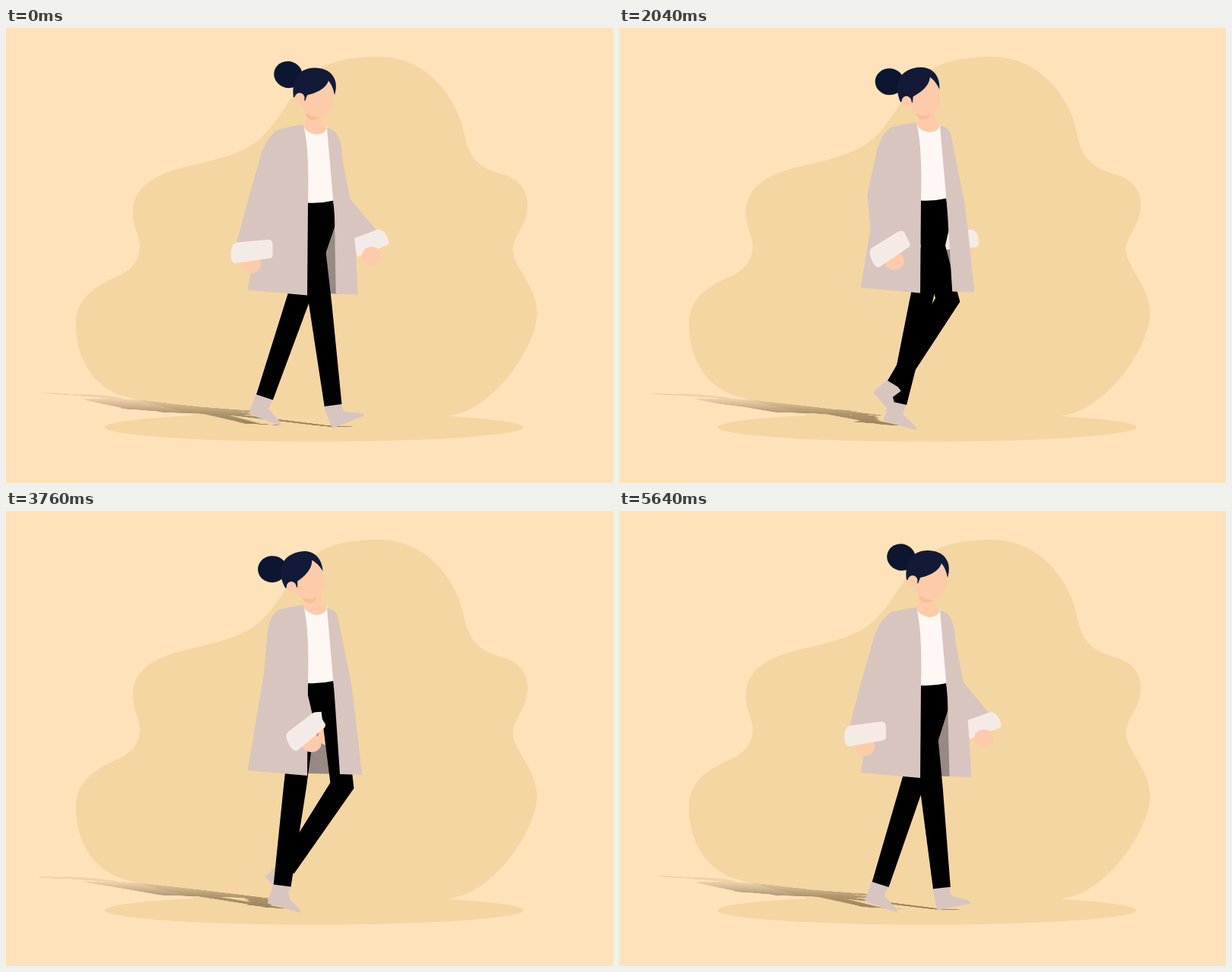
These frames come from a looping animation (800 px wide and 600 px high, 5.68 s). An HTML page with a canvas:

```html
<!DOCTYPE html>
<html>
<head>
<meta charset="utf-8">
<title>Walk cycle</title>
<style>
html, body { margin: 0; width: 100%; height: 100%; overflow: hidden; background: #ffe2ba; }
canvas { display: block; }
</style>
</head>
<body>
<canvas id="stage" width="800" height="600"></canvas>
<script>
const LOOP = 5680, CYCLE = LOOP / 5, { PI, sin, cos, max, min, hypot, sqrt } = Math;
const COAT = '#d8c5bf', CUFF = '#f5ebe6', SKIN = '#fdcba9', SAND = '#f4d6a3', HAIR = '#131a38', BUN = '#0d1631';
const BONE = 132; // thigh and shin have the same length

const layer = () => Object.assign(document.createElement('canvas'), { width: 800, height: 600 }).getContext('2d');
const stage = document.getElementById('stage').getContext('2d');
const fig = layer(), shade = layer();

const smooth = (t, a, b) => {
  const s = min(1, max(0, (t - a) / (b - a)));
  return s * s * (3 - 2 * s);
};
const fill = (g, color, d) => { g.fillStyle = color; g.fill(new Path2D(d)); };
const poly = (color, pts) => fill(fig, color, 'M' + pts.join('L') + 'Z');
function oval(color, x, y, rx, ry = rx, angle = 0, g = fig) {
  g.fillStyle = color;
  g.beginPath();
  g.ellipse(x, y, rx, ry, angle, 0, 7);
  g.fill();
}
function at(x, y, degrees, draw) {
  fig.save();
  fig.translate(x, y);
  fig.rotate(degrees * PI / 180);
  draw();
  fig.restore();
}
function spin(x, y, degrees) {
  const a = degrees * PI / 180, c = cos(a), s = sin(a);
  return [x * c - y * s, x * s + y * c];
}

// Tapered limb with mitred joints; points are [x, y, half width].
function limb(color, pts) {
  const normal = (a, b) => {
    const dx = b[0] - a[0], dy = b[1] - a[1], l = hypot(dx, dy);
    return [dy / l, -dx / l];
  };
  const left = [], right = [];
  pts.forEach(([x, y, w], i) => {
    const u = normal(pts[max(0, i - 1)], pts[max(1, i)]);
    const v = i < pts.length - 1 ? normal(pts[i], pts[i + 1]) : u;
    const k = w / (1 + u[0] * v[0] + u[1] * v[1]);
    const nx = (u[0] + v[0]) * k, ny = (u[1] + v[1]) * k;
    left.push([x + nx, y + ny]);
    right.unshift([x - nx, y - ny]);
  });
  poly(color, left.concat(right));
}

// The body sinks after each heel strike and rises as the legs pass.
function bobAt(p) {
  const a = 4 * PI * p;
  return 3.4 * sin(a) - 1.2 * sin(2 * a) - .5;
}

// q is the leg's own phase: 0 at heel strike, about .45 when the heel lifts.
function leg(q, hipX, bob) {
  const a = 2 * PI * q, hipY = 235 + bob;
  const lift = 29 * sin(PI * min(1, max(0, (q - .44) / .51)));
  const x = 375 + 48 * cos(a) + 19 * sin(a) + 11 * cos(2 * a) - 3 * cos(3 * a);
  const y = 498 + bob - lift;
  const foot = 12 - 16 * cos(a) - 18 * sin(a) - 16 * cos(2 * a) - 6 * sin(2 * a) - 5 * cos(3 * a);

  const dx = x - hipX, dy = y - hipY, d = hypot(dx, dy);
  const bend = sqrt(max(0, BONE ** 2 - d * d / 4)) / d;
  const knee = [hipX + dx / 2 + dy * bend, hipY + dy / 2 - dx * bend, 15];
  at(x, y, foot, () => fill(fig, COAT, 'M-12 -4L11 0L9 13L27 24Q32 27 31 30L-14 27Z'));
  limb('#000', [[hipX, hipY - 4, 16], knee, [x, y, 11.5]]);
}

function farArm(a) {
  const x = 440 + 42 * cos(a), y = 284, angle = 2 - 23 * cos(a);
  const lag = 482 - x, ex = 452 - lag * .25, sx = 443 - lag * .15;
  const outer = spin(11, -14, angle + 21), inner = spin(-21, -7, angle + 21);
  fill(fig, COAT, `M424 132C437 137 ${sx - 1} 148 ${sx} 166L${sx + 1} 185L${ex} 224
    L${x + outer[0] - 5} ${y + outer[1] - 3}L${x + inner[0]} ${y + inner[1]}L435 240Z`);
  at(x, y, angle, () => fill(fig, CUFF, 'M-21 -14L12 -14Q21 -13 22 0Q23 10 17 10L-24 10Z'));
  oval(SKIN, x, y + 17, 13, 12);
}

function nearArm(a) {
  const x = 373 - 49 * cos(a) + 3 * sin(a), y = 294, angle = -32 + 28 * cos(a) + 6.6 * sin(a);
  const ex = 333 - 13 * cos(a) + 2 * sin(a);
  const outer = spin(-20, -10, angle), inner = spin(20, -10, angle), hand = spin(-2.5, 18, angle);
  fill(fig, COAT, `M362 133Q347 139 ${ex + (348 - ex) * .6} 165L${ex} 224
    L${x + outer[0]} ${y + outer[1]}L${x + inner[0]} ${y + inner[1]}L397 243L397 160Z`);
  oval(SKIN, x + hand[0], y + hand[1], 13, 12);
  at(x, y, angle, () => fill(fig, CUFF,
    'M-19 -12L20 -13Q28 -13 28 -7L27 7Q27 12 21 12L-22 15Q-28 15 -28 6Q-27 -11 -19 -12Z'));
}

function torso(sway) {
  fill(fig, '#fff7f3', 'M391 131L424 131L432 228Q415 232 397 231Z');
  fill(fig, SKIN, 'M396 105L414 112Q415 126 423 131Q422 140 409 141Q396 139 392 130Q396 125 396 105Z');
  fill(fig, COAT, `M423 132Q433 134 437 142L455 232Q460 265 ${463 + sway} 352
    L${434 + sway} 351L433 248Z`);
  fill(fig, COAT, 'M392 128Q372 130 360 135Q351 148 347 175L318.5 346L397 353L398 230Q400 160 392 128Z');
}

// turn 0 looks forward, 1 looks back over the shoulder.
function head(tilt, turn) {
  const mix = (a, b) => a + (b - a) * turn;
  const dx = -3 * turn;
  fig.save();
  fig.translate(411, 127);
  fig.rotate(tilt * PI / 180);
  fig.translate(-411, -127);
  oval(BUN, mix(372, 431), mix(62, 66), 19, 17.5, .3);
  oval('#f8bd9b', mix(405, 406), 113, 10, 9);
  fill(fig, SKIN, `M${388 + dx} 80L${432 + dx} 66L${432 + dx} 95C${431 + dx} 110 ${420 + dx} 118 ${410 + dx} 118
    C${399 + dx} 117 ${391 + dx} 110 ${389 + dx} 98Z`);
  fill(fig, HAIR, `M${mix(379, 386)} ${mix(92, 88)}C${mix(376, 381)} 70 385 53 407 53
    C428 53 440 68 433 89Q${mix(431, 429)} ${mix(77, 91)} ${mix(425, 425)} ${mix(70, 90)}
    C${mix(421, 427)} ${mix(82, 72)} 406 87 ${mix(397, 388)} ${mix(89, 84)}
    L${mix(394, 387)} ${mix(97, 86)}L${mix(390, 386)} ${mix(89, 88)}Z`);
  oval(SKIN, mix(387, 429), mix(93, 97), mix(6.5, 5), 7);
  fig.restore();
}

function figure(t) {
  const p = t / CYCLE % 1, a = 2 * PI * p, bob = bobAt(p), sway = max(-1, -1.5 * bob);
  const tilt = -23 * (smooth(t, 1650, 2300) - smooth(t, 3660, 4290));
  const turn = smooth(t, 880, 1060) - smooth(t, 1200, 1440);

  fig.clearRect(0, 0, 800, 600);
  at(0, bob, 0, () => {
    poly('#978983', [[400, 225], [432, 225], [437 + sway, 351], [395, 350]]);
    farArm(a);
  });
  leg((p + .5) % 1, 427, bob);
  leg(p, 398, bob);
  at(0, bob, 0, () => {
    poly('#000', [[398, 225], [431, 225], [432, 247], [426, 268], [398, 270]]);
    torso(sway);
    head(tilt, turn);
    nearArm(a);
  });
}

const fade = shade.createLinearGradient(0, 40, 0, 530);
[[0, .07], [.2, .1], [.62, .4], [1, .5]].forEach(([s, a]) => fade.addColorStop(s, `rgba(66,49,24,${a})`));

// The shadow is the figure itself, laid flat on the ground.
function castShadow() {
  shade.globalCompositeOperation = 'copy';
  shade.drawImage(fig.canvas, 0, 0);
  shade.globalCompositeOperation = 'source-in';
  shade.fillStyle = fade;
  shade.fillRect(0, 0, 800, 600);
  stage.save();
  stage.imageSmoothingQuality = 'high';
  stage.transform(.93, .025, .65, .09, -314, 467.8);
  stage.drawImage(shade.canvas, 0, 0);
  stage.restore();
}

function backdrop() {
  stage.fillStyle = '#ffe2ba';
  stage.fillRect(0, 0, 800, 600);
  fill(stage, SAND, `M490 38C548 36 595 85 605 145C611 174 628 186 655 193C680 200 690 219 687 240
    C685 262 668 275 668 293C670 318 700 340 700 378C698 420 645 502 586 511L560 520L250 520L245 509
    C200 497 172 491 150 484C110 469 92 430 92 390C92 350 130 335 152 325C172 314 177 300 176 285
    C175 270 167 262 167 243C167 205 205 190 245 181C290 171 318 162 338 143C363 118 375 87 398 65
    C418 45 450 38 490 38Z`);
  oval(SAND, 406, 526.5, 276, 19, 0, stage);
}

const start = performance.now();
function frame() {
  figure((performance.now() - start) % LOOP);
  backdrop();
  castShadow();
  stage.drawImage(fig.canvas, 0, 0);
  requestAnimationFrame(frame);
}
frame();
</script>
</body>
</html>
```
